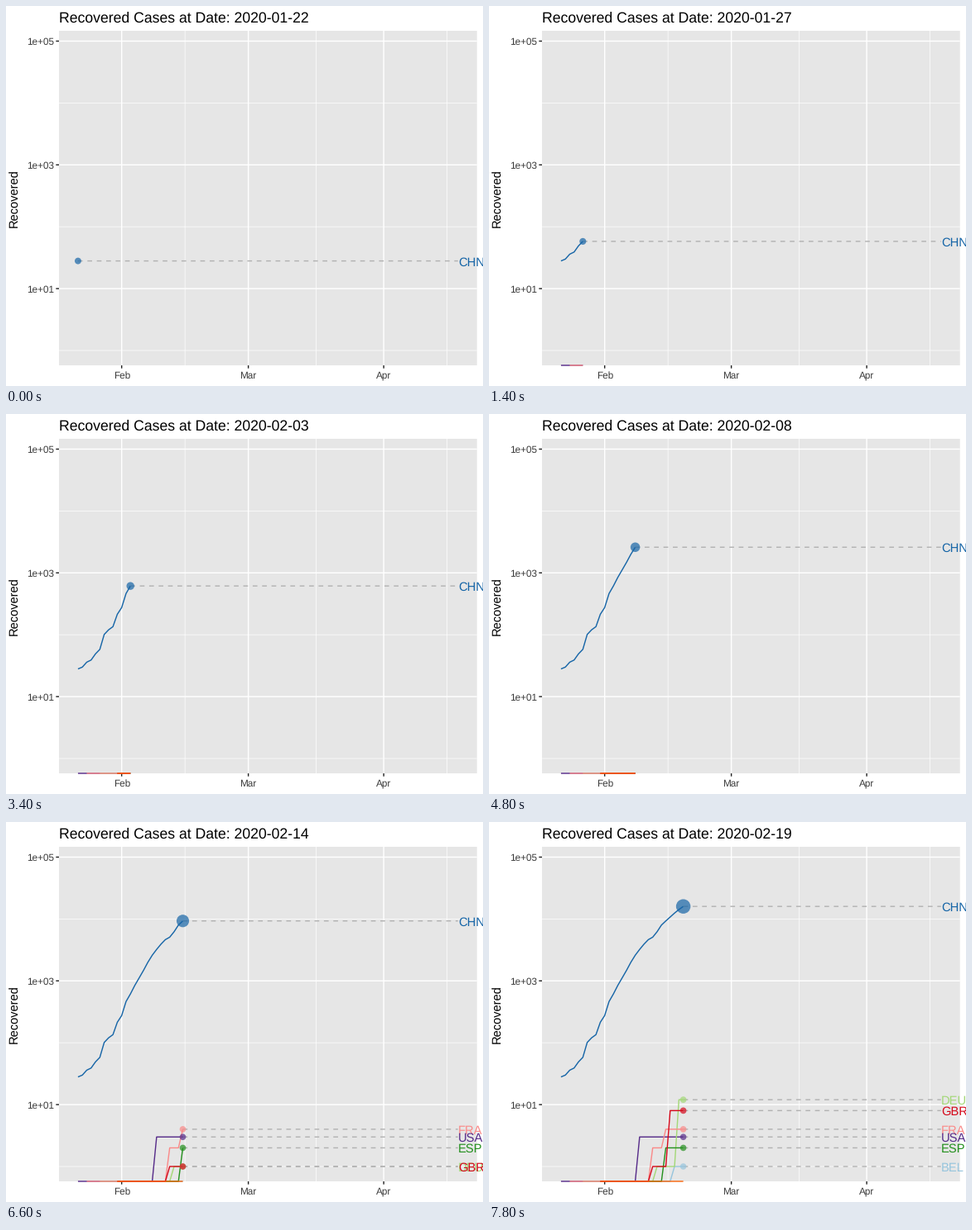
A matplotlib script that plays this animation: 576 by 460 pixels, repeating every 8 s.

```python
import numpy as np
import matplotlib.pyplot as plt
from matplotlib.animation import FuncAnimation
from matplotlib.patches import Circle, Rectangle

W, H, DPI = 576, 460, 64
PT = 72 / DPI                      # points per pixel
LEFT, RIGHT, TOP, BOTTOM = 64, 568.7, 30, 435
DAY_W = (RIGHT - LEFT) / 1.1 / 87  # pixels per day
X0 = LEFT + 4.35 * DAY_W           # 22 January
X_END = X0 + 87 * DAY_W
DECADE, Y_ONE = 74.9, 417
FRAMES, RATE = 40, 0.7215          # days per frame
DAYS = 31
LW = 1.42

plt.rcParams.update({
    "font.family": "Liberation Sans",
    "text.hinting": "none",
    "path.snap": False,
})


def steps(*jumps):
    """Daily counts from (day, value) jumps, zero before the first."""
    out = np.zeros(DAYS)
    for day, value in jumps:
        out[day:] = value
    return out


CHINA = np.array([
    28, 30, 36, 39, 49, 58, 101, 120, 135, 214, 275, 463, 614, 843, 1115,
    1477, 1999, 2596, 3219, 3918, 4636, 5082, 6217, 7977, 9298, 10755,
    12462, 14206, 15962, 18014, 18704], float)

# code: (colour, first day, daily counts)
COUNTRIES = {
    "BEL": ("#97c5dd", 13, steps((26, 1))),
    "CHN": ("#1665a7", 0, CHINA),
    "DEU": ("#a4d878", 5, steps((22, 1), (27, 12))),
    "ESP": ("#24901e", 10, steps((24, 2))),
    "FRA": ("#fa8a89", 2, steps((21, 2), (24, 4))),
    "GBR": ("#d50a1c", 9, steps((21, 1), (25, 8))),
    "ITA": ("#f8660c", 9, steps()),
    "USA": ("#572c8a", 0, steps((18, 3))),
}

# Each day lands on the nearest whole frame; positions in between are tweened.
ARRIVAL = np.round(np.arange(DAYS) / RATE)


def x_at(day):
    return X0 + day * DAY_W


def y_at(value):
    return Y_ONE - DECADE * np.log10(value) if value > 0 else BOTTOM


def value_at(counts, day):
    i = int(day)
    t = day - i
    if t == 0:
        return counts[i]
    a, b = counts[i], counts[i + 1]
    return a ** (1 - t) * b ** t if a > 0 and b > 0 else 0


fig = plt.figure(figsize=(W / DPI, H / DPI), dpi=DPI, facecolor="white")
ax = fig.add_axes([0, 0, 1, 1])
ax.set_xlim(0, W)
ax.set_ylim(H, 0)
ax.axis("off")


def line(xs, ys, color, width, z, **kw):
    return ax.plot(xs, ys, color=color, lw=width * PT, zorder=z,
                   solid_capstyle="butt", solid_joinstyle="round", **kw)[0]


def label(x, y, text, size, color="black", z=9, **kw):
    return ax.text(x, y, text, fontsize=size * PT, color=color, zorder=z,
                   **{"va": "baseline", **kw})


def grid_x(x, width):
    line([x, x], [TOP, BOTTOM], "white", width, 1)


def grid_y(y, width):
    line([LEFT, RIGHT], [y, y], "white", width, 1)


ax.add_patch(Rectangle((LEFT, TOP), RIGHT - LEFT, BOTTOM - TOP,
                       fc="#e6e6e6", lw=0, zorder=0))
for day in (24.5, 54.5, 84.5):
    grid_x(x_at(day), LW / 2)
for power in (0, 2, 4):
    grid_y(y_at(10.0 ** power), LW / 2)
for day, month in ((10, "Feb"), (39, "Mar"), (70, "Apr")):
    x = x_at(day)
    grid_x(x, LW)
    line([x, x], [BOTTOM, BOTTOM + 3.67], "#242424", LW, 2)
    label(x, 451, month, 11.73, "#3b3b3b", ha="center")
for power in (1, 3, 5):
    y = y_at(10.0 ** power)
    grid_y(y, LW)
    line([LEFT - 3.67, LEFT], [y, y], "#242424", LW, 2)
    label(57.6, y + 4.3, f"1e+0{power}", 11.73, "#3b3b3b", ha="right")

label(18, 233, "Recovered", 14.67, rotation=90, ha="right", va="center",
      rotation_mode="default")
title = label(LEFT, 20, "", 17.6)


class Track:
    """Line, dashed leader, dot and code of one country."""

    def __init__(self, code, color, start, counts):
        self.start, self.counts = start, counts
        z = 3 if code == "USA" else 3.5
        self.path = line([], [], color, LW, z)
        self.leader = line([], [], "#b2b2b2", LW, 4, ls=(0, (4, 4)))
        self.dot = Circle((0, 0), 1, fc=color, lw=0, alpha=0.7, zorder=5)
        ax.add_patch(self.dot)
        self.code = label(X_END, 0, code, 14.7, color, z=6)

    def show(self, day):
        days = [d for d in range(self.start, DAYS) if d < day]
        if day >= self.start:
            days.append(day)
        values = [value_at(self.counts, d) for d in days]
        self.path.set_data([x_at(d) for d in days], [y_at(v) for v in values])

        value = values[-1] if values else 0
        for part in (self.leader, self.dot, self.code):
            part.set_visible(value > 0)
        if value > 0:
            x, y = x_at(day), y_at(value)
            self.leader.set_data([x, X_END], [y, y])
            self.dot.center = (x, y)
            self.dot.set_radius(3.75 + 0.0395 * np.sqrt(value))
            self.code.set_position((X_END, y + 5.8))


tracks = [Track(code, *spec) for code, spec in COUNTRIES.items()]


def draw(k):
    date = np.datetime64("2020-01-22") + int(k * RATE)
    title.set_text(f"Recovered Cases at Date: {date}")
    day = float(np.interp(k, ARRIVAL, np.arange(DAYS)))
    for track in tracks:
        track.show(day)
    return []


anim = FuncAnimation(fig, draw, frames=FRAMES, init_func=lambda: draw(0),
                     interval=200, repeat=True, repeat_delay=0, blit=False)
plt.show()
```
